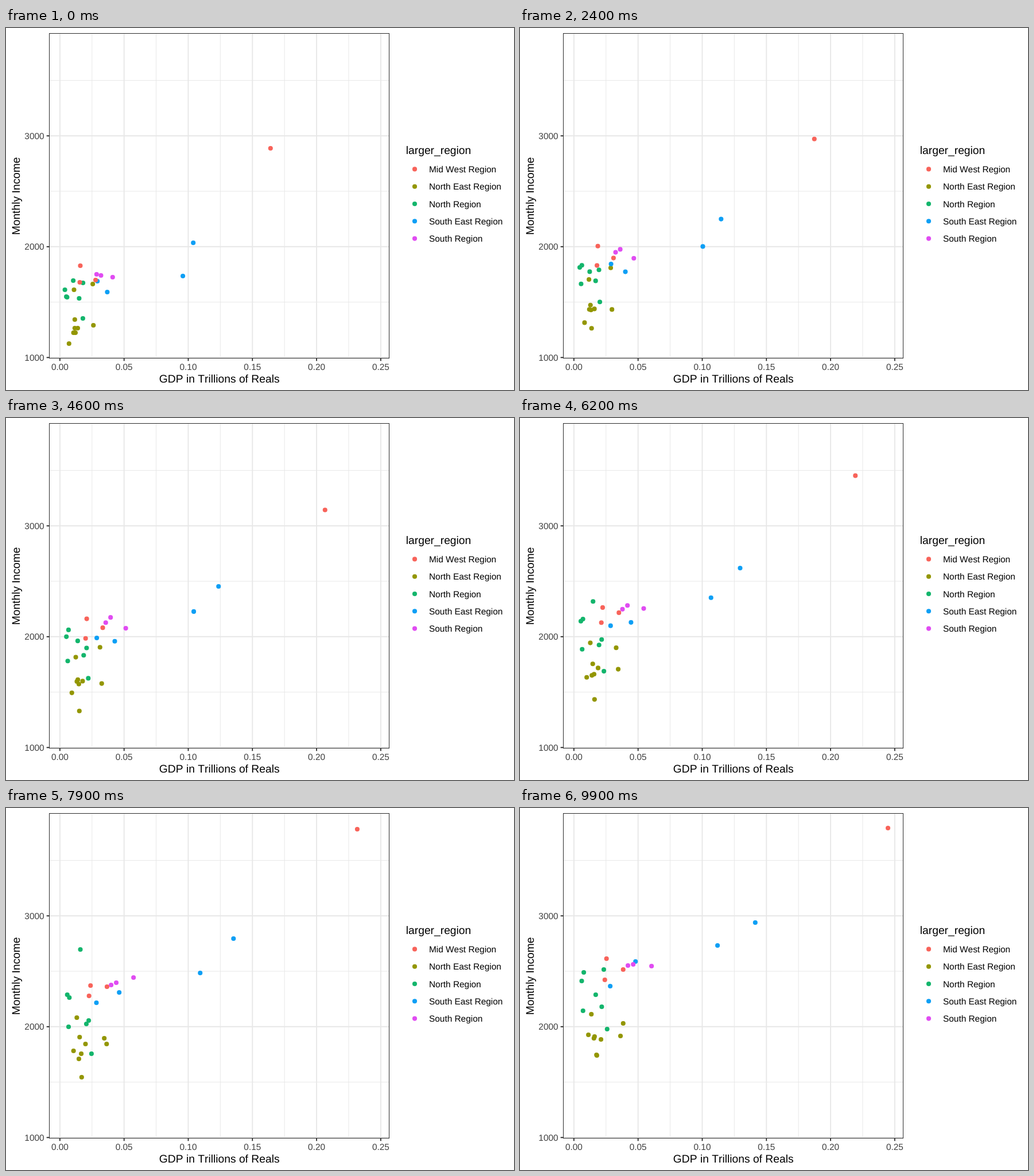
Animation of 885 by 632 pixels, one loop 10 s. Source, as an HTML page with a canvas:

```html
<!DOCTYPE html>
<html lang="en">
<head>
<meta charset="utf-8">
<title>Income and GDP by region</title>
<style>
  html, body { margin: 0; width: 100%; height: 100%; overflow: hidden; background: #fff; }
  canvas { display: block; }
</style>
</head>
<body>
<canvas id="stage" width="885" height="632"></canvas>
<script>
const ctx = document.getElementById('stage').getContext('2d');
const FONT = '"Liberation Sans", Arial, sans-serif';
const SMALL = 15.4, LARGE = 19.25;
const PANEL = { left: 75.5, top: 9.5, right: 667.5, bottom: 576.5 };
const GRID = '#e7e7e7', DARK = '#2b2b2b', LABEL = '#3f3f3f';
const STEP = 100, FRAMES = 100;
const KEYS = [0, 40, 79, 99]; // steps of the height key points

const gdpX = v => 93.9 + v * 2236;
const incomeY = v => 575.3 - (v - 1000) * 0.1935;

// Each dot: GDP in billions at the start and end, then its height at each key.
const regions = [
  {
    name: 'North Region', color: '#13b56c', dots: [
      [15, 21.7, 472, 421, 377, 347],
      [5, 7.1, 469, 432, 382, 354],
      [18, 23.3, 445, 407, 371, 282],
      [3.9, 6.1, 457, 392, 326, 302],
      [17.9, 25.9, 507, 459, 429, 386],
      [5.6, 7.7, 470, 377, 331, 287],
      [10.4, 17, 441, 415, 247, 326]
    ]
  },
  {
    name: 'North East Region', color: '#939600', dots: [
      [12.1, 17.9, 532, 519, 470, 432],
      [7.1, 11.3, 551, 490, 424, 396],
      [13.9, 21.1, 524, 468, 412, 404],
      [11.6, 16.1, 509, 467, 400, 399],
      [10.6, 15.6, 532, 464, 438, 402],
      [25.6, 36.3, 447, 400, 402, 398],
      [11.6, 17.6, 524, 471, 429, 431],
      [11, 13.6, 457, 427, 366, 360],
      [26.1, 38.4, 519, 473, 412, 376]
    ]
  },
  {
    name: 'South East Region', color: '#0d9ff5', dots: [
      [36.9, 48, 461, 402, 322, 268],
      [29.2, 28.3, 442, 392, 340, 311],
      [95.8, 111.9, 433, 347, 288, 240],
      [103.9, 141.3, 375, 306, 228, 200]
    ]
  },
  {
    name: 'South Region', color: '#e04cf2', dots: [
      [28.6, 42.1, 430, 366, 309, 275],
      [32, 46.2, 432, 356, 305, 273],
      [41.1, 60.5, 435, 380, 296, 276]
    ]
  },
  {
    name: 'Mid West Region', color: '#f8635a', dots: [
      [15.5, 24.1, 444, 395, 328, 300],
      [15.9, 25.4, 415, 358, 310, 263],
      [27.8, 38.4, 440, 376, 312, 282],
      [164.1, 244.7, 210, 183, 37, 35]
    ]
  }
];
const legend = [regions[4], ...regions.slice(0, 4)];
[legend[1], legend[2]] = [legend[2], legend[1]];

const mix = (a, b, p) => a + (b - a) * p;

function line(x1, y1, x2, y2, width, color) {
  ctx.lineWidth = width;
  ctx.strokeStyle = color;
  ctx.beginPath();
  ctx.moveTo(x1, y1);
  ctx.lineTo(x2, y2);
  ctx.stroke();
}

function text(str, x, y, size, color, align) {
  ctx.font = size + 'px ' + FONT;
  ctx.fillStyle = color;
  ctx.textAlign = align;
  ctx.fillText(str, x, y);
}

function dot(x, y, color) {
  ctx.fillStyle = color;
  ctx.beginPath();
  ctx.arc(x, y, 4.05, 0, Math.PI * 2);
  ctx.fill();
}

const vertical = (v, width) => line(gdpX(v), PANEL.top, gdpX(v), PANEL.bottom, width, GRID);
const horizontal = (v, width) => line(PANEL.left, incomeY(v), PANEL.right, incomeY(v), width, GRID);

function drawGrid() {
  for (let i = 0; i < 5; i++) vertical(0.025 + i * 0.05, 0.95);
  for (let v = 1500; v < 4000; v += 1000) horizontal(v, 0.95);
  for (let i = 0; i < 6; i++) vertical(i * 0.05, 1.87);
  for (let v = 1000; v < 4000; v += 1000) horizontal(v, 1.87);
}

function drawAxes() {
  const { left, top, right, bottom } = PANEL;
  ctx.lineWidth = 1;
  ctx.strokeStyle = DARK;
  ctx.strokeRect(left, top, right - left, bottom - top);
  for (let i = 0; i < 6; i++) {
    const x = gdpX(i * 0.05);
    line(x, bottom, x, bottom + 4.8, 1.87, DARK);
    text((i * 0.05).toFixed(2), x, 596.8, SMALL, LABEL, 'center');
  }
  for (let v = 1000; v < 4000; v += 1000) {
    const y = incomeY(v);
    line(left - 4.8, y, left, y, 1.87, DARK);
    text(String(v), 66.6, y + 5.6, SMALL, LABEL, 'right');
  }
  text('GDP in Trillions of Reals', 371.7, 619, LARGE, '#000', 'center');
  ctx.save();
  ctx.translate(23.8, 293.4);
  ctx.rotate(-Math.PI / 2);
  text('Monthly Income', 0, 0, LARGE, '#000', 'center');
  ctx.restore();
}

function drawLegend() {
  text('larger_region', 696.8, 220, LARGE, '#000', 'left');
  legend.forEach(({ name, color }, i) => {
    const y = 246.4 + i * 30.3;
    dot(712, y, color);
    text(name, 737, y + 5.6, SMALL, '#000', 'left');
  });
}

function drawDots(frame) {
  const t = frame / (FRAMES - 1);
  const growth = t + 0.25 * t * (1 - t); // slows down a little towards the end
  let k = 0;
  while (k < KEYS.length - 2 && frame >= KEYS[k + 1]) k++;
  const p = (frame - KEYS[k]) / (KEYS[k + 1] - KEYS[k]);
  for (const { color, dots } of regions) {
    for (const [from, to, ...heights] of dots) {
      dot(gdpX(mix(from, to, growth) / 1000), mix(heights[k], heights[k + 1], p), color);
    }
  }
}

function draw(frame) {
  ctx.fillStyle = '#fff';
  ctx.fillRect(0, 0, 885, 632);
  drawGrid();
  drawDots(frame);
  drawAxes();
  drawLegend();
}

ctx.fontKerning = 'none';
ctx.textRendering = 'geometricPrecision';
const start = performance.now();
function tick() {
  const time = Math.max(0, performance.now() - start);
  draw(Math.floor(time / STEP) % FRAMES);
  requestAnimationFrame(tick);
}
tick();
</script>
</body>
</html>
```
